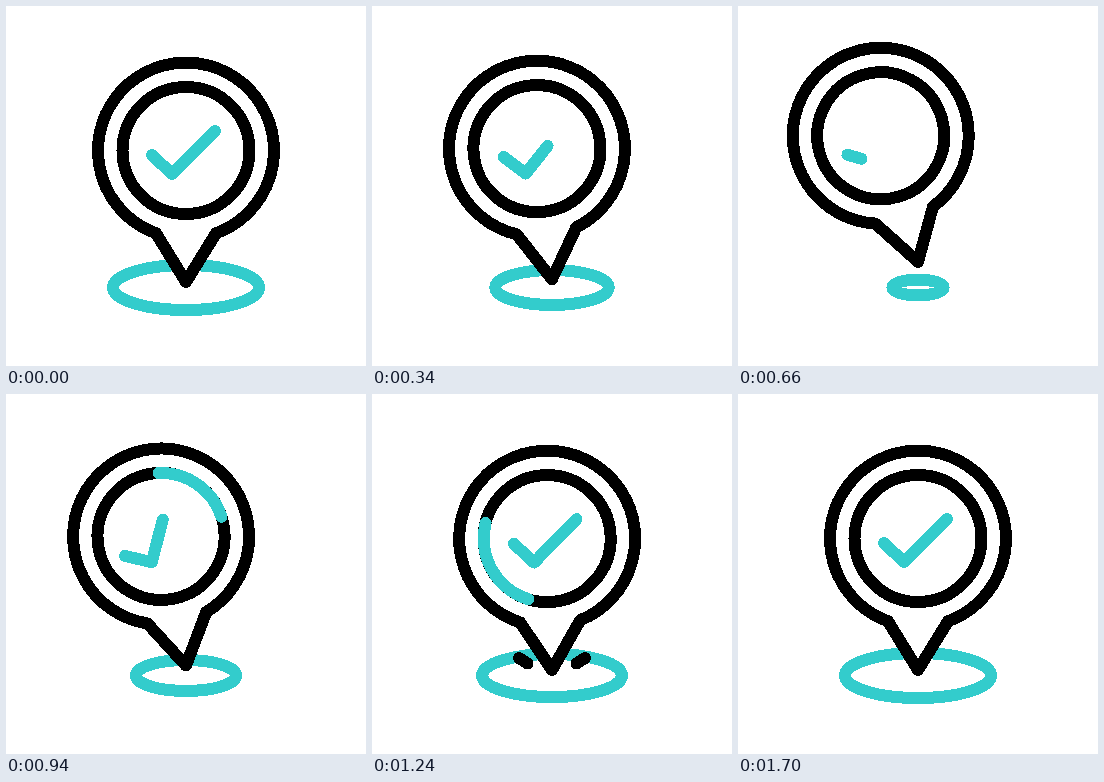
An HTML page for the animation above (3 s loop, 360 px wide and 360 px high).

```html
<!DOCTYPE html>
<html lang="en">
<head>
<meta charset="utf-8">
<title>Location check</title>
<style>
  html, body { margin: 0; width: 100%; height: 100%; overflow: hidden; background: #fff; }
  svg { display: block; width: 100%; height: 100%; shape-rendering: crispEdges; }
  .line { fill: none; stroke: #000; stroke-width: 12; stroke-linecap: round; stroke-linejoin: round; }
  .teal { stroke: #33cccc; }
</style>
</head>
<body>
<svg viewBox="0 0 360 360">
  <ellipse id="base" class="line teal" cx="180" cy="281.5"/>
  <path id="sparkL" class="line" pathLength="1" d="M163.5 274.5L147 264"/>
  <path id="sparkR" class="line" pathLength="1" d="M196.5 274.5L213 264"/>
  <g id="pin">
    <path class="line" style="fill:#fff" d="M150 227.3A88 88 0 1 1 210 227.3L180 276Z"/>
    <circle class="line" cx="180" cy="144.5" r="63.5"/>
    <path id="arc" class="line teal" pathLength="1" d="M180 81a63.5 63.5 0 0 1 0 127a63.5 63.5 0 0 1 0 -127"/>
    <path id="check" class="line teal" pathLength="1" d="M146 149L166 168L209 125"/>
  </g>
</svg>
<script>
const LOOP = 3000, SETTLE = 1700, HOLD = 20;
const $ = id => document.getElementById(id);

// Cosine ease from 0 to 1 between times a and b; power < 1 makes it start faster.
function ease(t, a, b, power = 1) {
  const u = Math.min(1, Math.max(0, (t - a) / (b - a)));
  return (1 - Math.cos(Math.PI * u ** power)) / 2;
}

// Offset that moves out to `far`, swings back past rest by `over`, then wobbles to a stop.
function swing(t, { from, turn, land, far, over, half }) {
  if (t < land) {
    return far * ease(t, from, turn) + (over - far) * ease(t, turn + HOLD, land);
  }
  const fade = Math.max(0, (SETTLE - t) / (SETTLE - land)) ** 1.5;
  return over * fade * Math.cos(Math.PI * (t - land) / half);
}

const tilt = { from: 0, turn: 835, land: 1075, far: -18.35, over: 4, half: 140 };
const spread = { from: 60, turn: 800, land: 1065, far: -0.71, over: 0.1, half: 140 };
const twist = { from: 450, turn: 860, land: 1200, far: -22, over: 6, half: 100 };

// Accelerates upward, then eases back down.
const lift = t => t < 670 ? 21 * (t / 670) ** 3 : 21 * (1 - ease(t, 670, 1060));

function trim(el, from, to) {
  const len = to - from;
  el.style.display = len > 0.004 ? "" : "none";
  el.setAttribute("stroke-dasharray", `${Math.max(0, len)} 2`);
  el.setAttribute("stroke-dashoffset", -from);
}

const base = $("base"), pin = $("pin"), arc = $("arc"), check = $("check");
const sparks = [$("sparkL"), $("sparkR")];

function render(t) {
  const scale = 1 + swing(t, spread);
  base.setAttribute("rx", 73 * scale);
  base.setAttribute("ry", 22.5 * scale);
  pin.setAttribute("transform", `translate(0 ${-lift(t)}) rotate(${swing(t, tilt)} 180 276)`);
  check.setAttribute("transform", `rotate(${swing(t, twist)} 166 168)`);
  trim(check, 0, 1 - ease(t, 30, 890) + ease(t, 820, 990));
  trim(arc, ease(t, 905, 1680, 0.75), ease(t, 780, 1520, 0.75));
  sparks.forEach(el => trim(el, ease(t, 1040, 1450), ease(t, 1030, 1180)));
}

const start = performance.now();
function tick() {
  render((performance.now() - start) % LOOP);
  requestAnimationFrame(tick);
}
tick();
</script>
</body>
</html>
```
